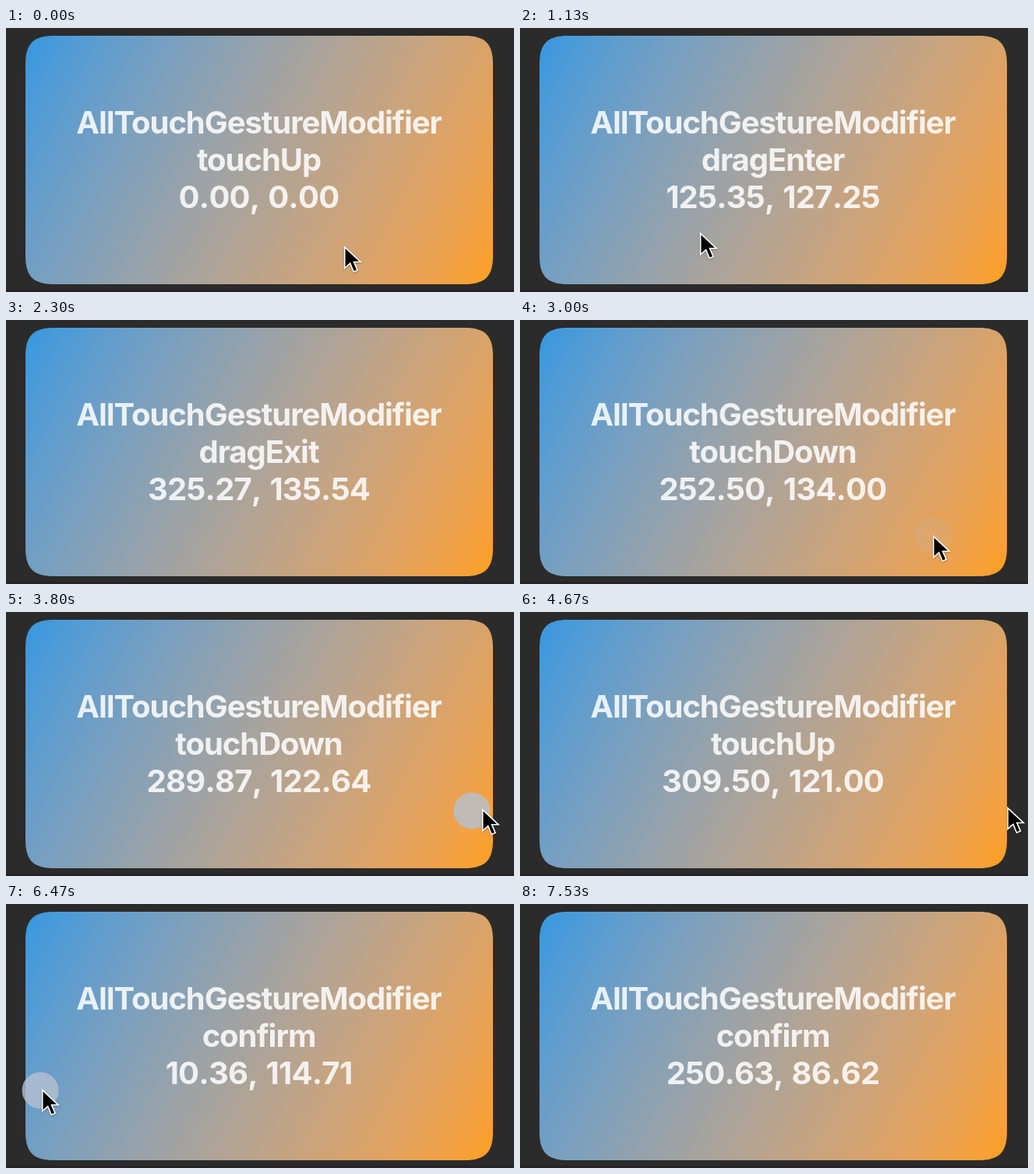
An HTML page that plays this animation: 652 px wide and 340 px high, repeating every 7.74 s.

```html
<!DOCTYPE html>
<html lang="en">
<head>
<meta charset="utf-8">
<title>Touch gesture demo</title>
<style>
  html, body { margin: 0; width: 100%; height: 100%; overflow: hidden; background: #2b2b2b; }
  body { position: relative; }
  #floor { position: absolute; left: 0; top: 337px; width: 652px; height: 3px; background: #272226; }
  #card {
    position: absolute; left: 25px; top: 10px; width: 600px; height: 320px;
    background: linear-gradient(118.07deg in oklab, #3498e0, #ff9f1c);
    clip-path: path("M0 37C0 10 10 0 37 0H563C590 0 600 10 600 37V283C600 310 590 320 563 320H37C10 320 0 310 0 283Z");
  }
  svg { position: absolute; left: 0; top: 0; width: 652px; height: 340px; }
  text {
    font: 700 40px Inter, "Liberation Sans", sans-serif;
    letter-spacing: -.0265em;
    text-anchor: middle;
    fill: #fff;
    fill-opacity: .85;
  }
  #coords { letter-spacing: -.019em; word-spacing: 2px; font-kerning: none; }
  #cursor { filter: drop-shadow(0 1px 1px rgba(0, 0, 0, .3)); }
</style>
</head>
<body>
<div id="floor"></div>
<div id="card"></div>
<svg viewBox="0 0 652 340">
  <text x="324.5" y="136">AllTouchGestureModifier</text>
  <text id="label" x="324.5" y="184">touchUp</text>
  <text id="coords" x="324.5" y="232">0.00, 0.00</text>
  <circle id="touch" r="23.5" fill="#b6c1d2" fill-opacity=".8"/>
  <path id="cursor" d="M1.5 3.5V27L8 21.2L12.6 32.4L16 31L11.3 20H19Z"
        fill="#000" stroke="#fff" stroke-width="3.2" paint-order="stroke"/>
</svg>
<script>
const LOOP = 7740, STEP = 100 / 3;

const ease = {
  lin: p => p,
  in: p => p * p,
  out: p => 1 - (1 - p) * (1 - p),
  both: p => p < .5 ? 2 * p * p : 1 - 2 * (1 - p) * (1 - p)
};

// Pointer path: step, x, y, easing towards the next point
const path = [
  [0, 434, 281.5, 'both'], [24, 638, 274, 'lin'],
  [33, 275.7, 264.5, 'lin'], [34, 231, 264, 'out'], [42, -12, 264, 'lin'],
  [46, -12, 264, 'in'], [68, 675.54, 281.08, 'lin'],
  [71, 675.54, 281.08, 'lin'], [72, 626, 280, 'out'], [84, 530, 278, 'lin'],
  [102, 530, 278, 'lin'], [112, 598, 256, 'lin'], [113, 604.74, 255.28, 'lin'],
  [114, 611, 254, 'out'], [122, 644, 252, 'lin'],
  [138, 644, 252, 'both'], [154, 44.54, 243.7, 'lin'], [155, 43, 243, 'out'],
  [161, 18, 242, 'lin'],
  [179, 18, 242, 'out'], [192, 44, 240, 'lin'], [193, 45.72, 239.42, 'lin'],
  [194, 46, 239, 'both'], [203, 522, 186, 'out'], [206, 526.26, 183.24, 'lin'],
  [211, 526.26, 183.24, 'in'], [226, 545, 345, 'lin']
];

// Label: first step, text, step after which the coordinates hold
const states = [
  [0, 'touchUp', -1],
  [25, 'dragEnter', 42], [39, 'dragExit', 42],
  [52, 'dragEnter', 68], [68, 'dragExit', 68],
  [72, 'touchUp', 68],
  [90, 'touchDown', 122], [116, 'dragExit', 122], [127, 'touchUp', 122],
  [141, 'dragEnter', 161], [158, 'dragExit', 161], [169, 'touchUp', 161],
  [184, 'touchDown', 206], [192, 'confirm', 206],
  [196, 'dragEnter', 206], [212, 'confirm', 206]
];

// Touch dot: first and last step
const presses = [[90, 121], [184, 195]];

const $ = id => document.getElementById(id);
const label = $('label'), coords = $('coords'), touch = $('touch'), cursor = $('cursor');

const current = (rows, step) => rows.findLastIndex(row => row[0] <= step);

function pointer(step) {
  const i = current(path, step);
  const [s0, x0, y0, kind] = path[i];
  const next = path[i + 1];
  if (!next) return [x0, y0];
  const p = ease[kind]((step - s0) / (next[0] - s0));
  return [x0 + (next[1] - x0) * p, y0 + (next[2] - y0) * p];
}

function coordText(step, hold) {
  if (hold < 0) return '0.00, 0.00';
  const [x, y] = pointer(Math.min(step - 1, hold));
  return `${((x - 25) / 2).toFixed(2)}, ${((y - 10) / 2).toFixed(2)}`;
}

function draw(time) {
  const step = Math.floor((time % LOOP + 4) / STEP);
  const [, name, hold] = states[current(states, step)];
  label.textContent = name;
  coords.textContent = coordText(step, hold);

  const [x, y] = pointer(step);
  cursor.setAttribute('transform', `translate(${x} ${y - 1})`);

  const press = presses.find(([a, b]) => step >= a && step <= b);
  touch.setAttribute('opacity', press ? Math.min(1, (step - press[0] + 1) / 6) : 0);
  if (press) {
    // The dot trails the pointer by two steps
    const [cx, cy] = pointer(step - 2);
    touch.setAttribute('cx', cx);
    touch.setAttribute('cy', cy);
  }
}

const start = performance.now();
function tick() {
  draw(performance.now() - start);
  requestAnimationFrame(tick);
}
tick();
</script>
</body>
</html>
```
